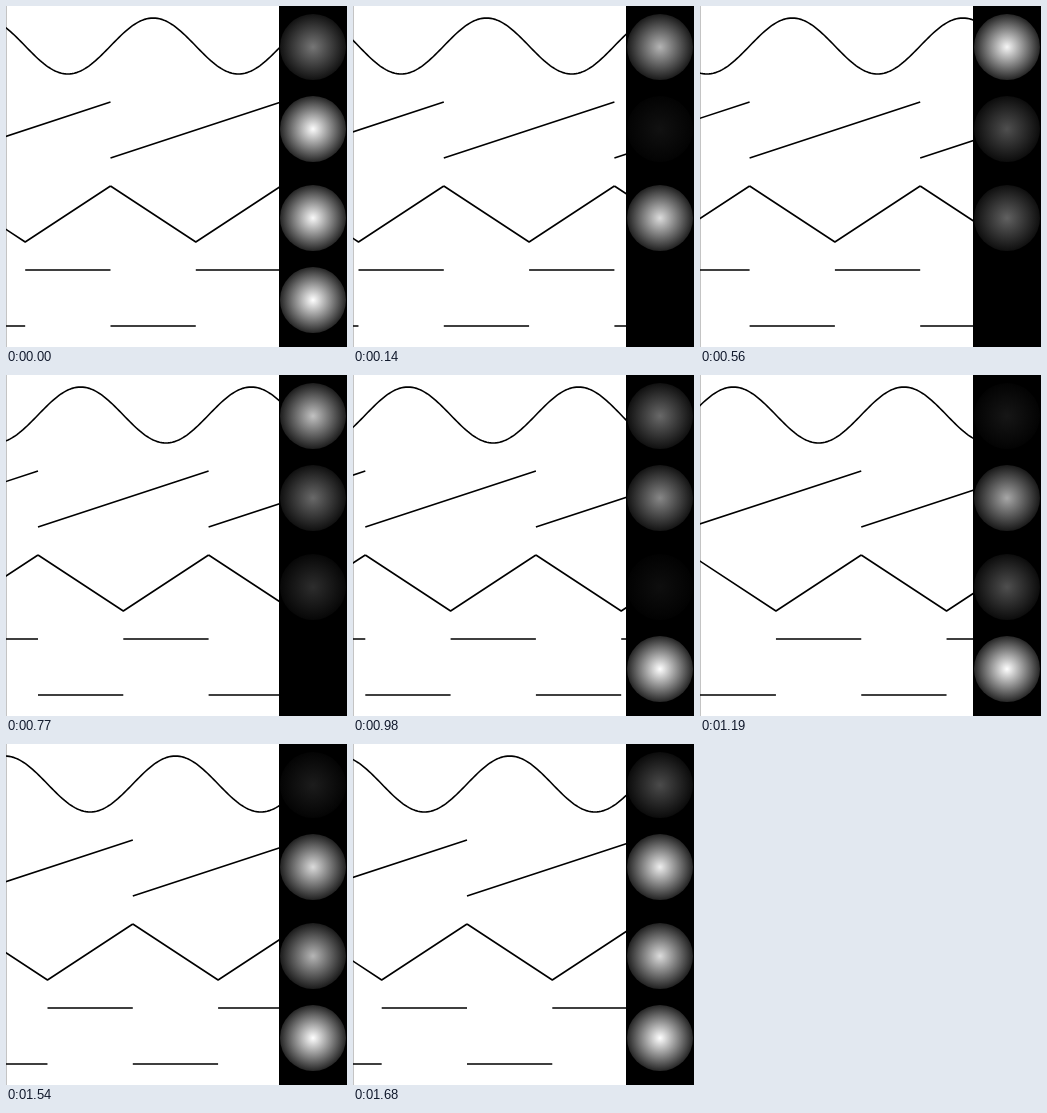
Recreate the animation shown at these times as an HTML page with a canvas. Size 341x341 px, loop 1.75 s.

```html
<!DOCTYPE html>
<html lang="en">
<head>
<meta charset="utf-8">
<title>Waveforms</title>
<style>
  html, body { margin: 0; width: 100%; height: 100%; overflow: hidden; background: #fff; }
  canvas { display: block; width: 341px; height: 341px; }
</style>
</head>
<body>
<canvas id="stage" width="341" height="341"></canvas>
<script>
const ctx = document.getElementById('stage').getContext('2d');
const GRAPH = 273, PERIOD = 170.6, HEIGHT = 56, LAMP_X = 307, LAMP_R = 33;
const STEP = 70, STEPS = 25;

// Scroll distance in px at a few steps; the pace is slightly uneven.
const SCROLL = [[0, 0], [4, 27.4], [8, 54.9], [11, 72.5], [14, 92.2], [20, 135.5], [24, 161.1], [25, PERIOD]];

// Each wave maps a cycle position 0..1 to a level 0..1; points are its corners.
const WAVES = [
  { top: 12, lamp: 41, level: p => 0.5 + 0.5 * Math.sin(2 * Math.PI * p),
    points: Array.from({ length: 81 }, (_, i) => i / 80) },
  { top: 96, lamp: 123, level: p => p, points: [0, 1] },
  { top: 180, lamp: 212, level: p => Math.abs(1 - 2 * p), points: [0, 0.5, 1] },
  { top: 264, lamp: 294, level: p => p < 0.5 ? 0 : 1, points: [0, 0.4999, null, 0.5, 1] }
];

function scrollAt(step) {
  const i = SCROLL.findIndex(([s]) => s > step);
  const [s0, d0] = SCROLL[i - 1], [s1, d1] = SCROLL[i];
  return d0 + (d1 - d0) * (step - s0) / (s1 - s0);
}

function drawWave({ top, level, points }, start) {
  ctx.beginPath();
  for (let x = start - 2 * PERIOD; x < GRAPH; x += PERIOD) {
    let pen = 'moveTo';
    for (const p of points) {
      if (p === null) { pen = 'moveTo'; continue; }
      ctx[pen](x + p * PERIOD, top + HEIGHT * (1 - level(p)));
      pen = 'lineTo';
    }
  }
  ctx.stroke();
}

function drawLamp(y, level) {
  const grey = k => `rgb(${Array(3).fill(Math.round(255 * k * level))})`;
  const glow = ctx.createRadialGradient(LAMP_X, y, 0, LAMP_X, y, LAMP_R);
  glow.addColorStop(0, grey(1));
  glow.addColorStop(1, grey(0.15));
  ctx.fillStyle = glow;
  ctx.beginPath();
  ctx.arc(LAMP_X, y, LAMP_R, 0, 2 * Math.PI);
  ctx.fill();
}

function draw(time) {
  const start = 104.5 - scrollAt(Math.floor(time / STEP) % STEPS);
  const phase = ((GRAPH - start) / PERIOD) % 1;

  ctx.fillStyle = '#fff';
  ctx.fillRect(0, 0, GRAPH, 341);
  ctx.fillStyle = '#c4c4c4';
  ctx.fillRect(0, 0, 1, 341);
  ctx.strokeStyle = '#000';
  ctx.lineWidth = 1.6;
  ctx.lineJoin = 'round';
  for (const wave of WAVES) drawWave(wave, start);

  ctx.fillStyle = '#000';
  ctx.fillRect(GRAPH, 0, 341 - GRAPH, 341);
  for (const { lamp, level } of WAVES) drawLamp(lamp, level(phase));
}

const origin = performance.now();
function tick() {
  draw(performance.now() - origin);
  requestAnimationFrame(tick);
}
tick();
</script>
</body>
</html>
```
